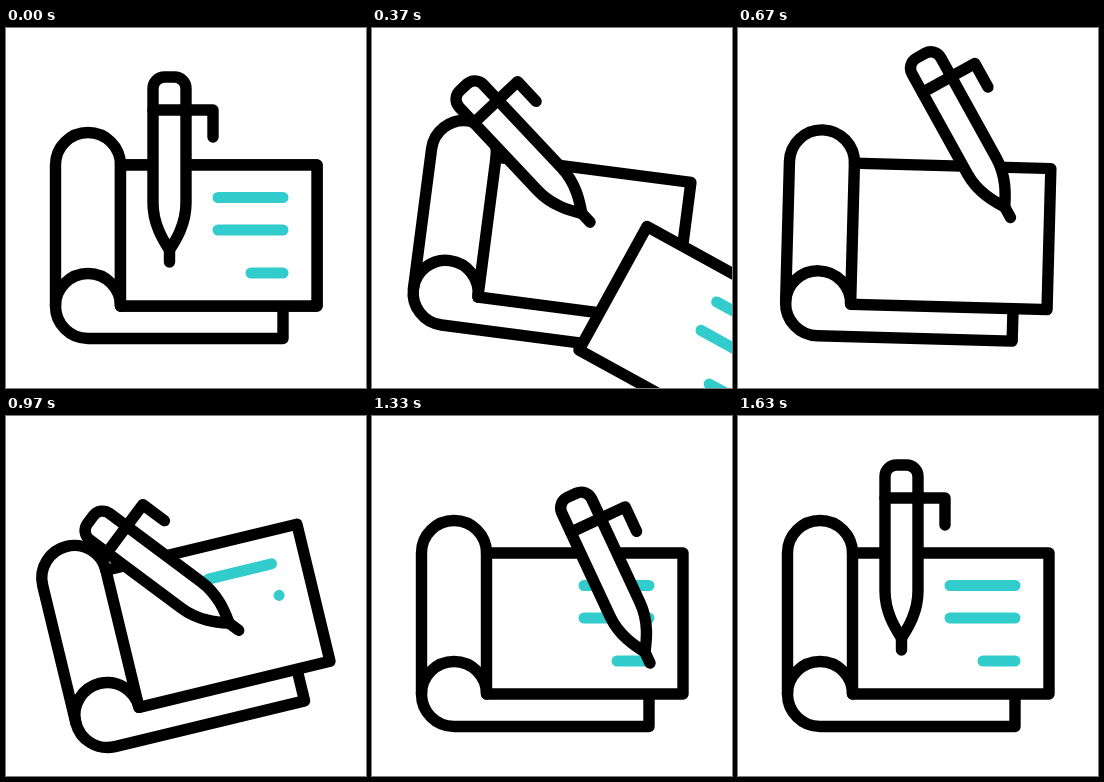
These frames come from a looping animation (360 by 360 pixels, 2000 ms). An HTML page:

```html
<!DOCTYPE html>
<html lang="en">
<head>
<meta charset="utf-8">
<title>Writing on a scroll</title>
<style>
  html, body { margin: 0; width: 100%; height: 100%; overflow: hidden; background: #fff; }
  svg { display: block; width: 100vw; height: 100vh; }
  path { fill: none; stroke: #000; stroke-width: 11.4; stroke-linecap: round; stroke-linejoin: round; }
  .paper { fill: #fff; }
  .ink { stroke: #33cccc; stroke-width: 11; }
</style>
</head>
<body>
<svg viewBox="0 0 360 360">
  <g id="scroll">
    <path d="M114.5 137A32.5 32.5 0 0 0 49.5 137V278A32.5 32.5 0 0 0 82 310.5H277V278"/>
    <path d="M49.5 278A32.5 32.5 0 0 1 114.5 278"/>
    <path class="paper" d="M114.5 137H311V278H114.5Z"/>
    <path id="writing" class="ink"/>
    <g id="page">
      <path class="paper" d="M114.5 137H311V278H114.5Z"/>
      <path class="ink" d="M277 169.5h-65M277 202h-65M277 245h-32"/>
    </g>
  </g>
  <g id="pen">
    <g transform="translate(-163.5 -234)">
      <path class="paper" d="M147 175C147 196 157 212 163.5 222C170 212 180 196 180 175V60.5A11.5 11.5 0 0 0 168.5 49H158.5A11.5 11.5 0 0 0 147 60.5Z"/>
      <path d="M163.5 222V234M147 82H207V109"/>
    </g>
  </g>
</svg>
<script>
const LOOP = 2000, STEPS = 60;
const HOLD_FROM = 20, HOLD_TO = 23;
const WRITE_FROM = 22, WRITE_SPEED = 65 / 7;
const [scroll, page, writing, pen] =
  ['scroll', 'page', 'writing', 'pen'].map(id => document.getElementById(id));

const LINES = [{ y: 169.5, length: 65 }, { y: 202, length: 65 }, { y: 245, length: 32 }];

// Where the pen tip comes to rest between its moves
const REST = { x: 163.5, y: 234, angle: 0 };
const POSES = [
  { at: 0, ...REST },
  { at: 12, x: 219, y: 193.5, angle: -44 },
  { at: 20, x: 272.5, y: 189.5, angle: -29 },
  { at: 29, x: 232.7, y: 214.3, angle: -53.3 },
  { at: 40, x: 278, y: 247, angle: -25 },
  { at: 49, ...REST }
];

// Sine ease from 0 to 1 between two steps
function ease(n, from, to) {
  const u = Math.min(1, Math.max(0, (n - from) / (to - from)));
  return (1 - Math.cos(Math.PI * u)) / 2;
}

function penValue(n, key) {
  return POSES.slice(1).reduce((value, pose, i) =>
    value + (pose[key] - POSES[i][key]) * ease(n, POSES[i].at, pose.at), POSES[0][key]);
}

// Lines follow each other at one speed, each from right to left
function writtenPath(n) {
  let ink = (n - WRITE_FROM) * WRITE_SPEED, d = '';
  for (const { y, length } of LINES) {
    if (ink > -0.01) d += `M277 ${y}h${-Math.min(length, Math.max(0.01, ink))}`;
    ink -= length;
  }
  return d;
}

function draw(time) {
  let n = Math.floor((time % LOOP + 3.4) * STEPS / LOOP) % STEPS;
  if (n > HOLD_FROM && n <= HOLD_TO) n = HOLD_FROM;

  const swing = 11.3 * ease(n, 5, 15) - 26.3 * ease(n, 15, 27) + 15 * ease(n, 27, 37);
  scroll.setAttribute('transform', `rotate(${swing} 180 207)`);

  // The written page slides away along a bend
  const turn = 47 * ease(n, 2.5, 20.5), u = turn / 10;
  const dx = 71.4 * u - 5.9 * u * u, dy = 16.4 * u + 9.8 * u * u;
  page.setAttribute('transform', `translate(${dx} ${dy}) rotate(${turn} 212.75 207.5)`);
  page.style.display = n < HOLD_FROM ? '' : 'none';
  writing.setAttribute('d', writtenPath(n));

  const [x, y, angle] = ['x', 'y', 'angle'].map(key => penValue(n, key));
  pen.setAttribute('transform', `translate(${x} ${y}) rotate(${angle})`);
}

const begin = performance.now();
function tick() {
  draw(performance.now() - begin);
  requestAnimationFrame(tick);
}
tick();
</script>
</body>
</html>
```
